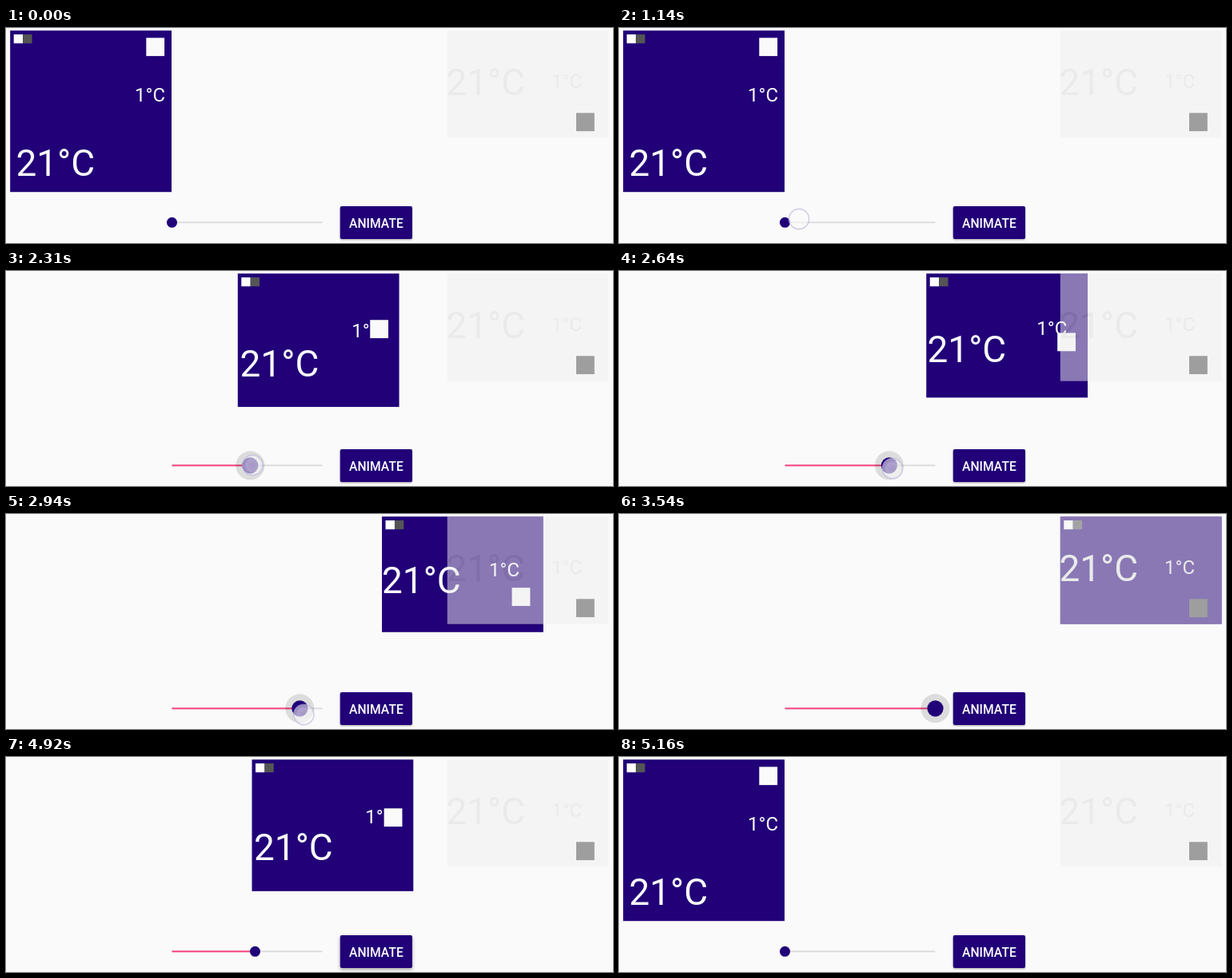
Recreate the animation shown at these times as an HTML page. Size 759x269 px, loop 6450 ms.

```html
<!DOCTYPE html>
<html lang="en">
<head>
<meta charset="utf-8">
<title>Card transition</title>
<style>
  /* p: progress, grip: thumb pressed, lift: button pressed, dx/ty/tap: finger offset, height and visibility */
  @property --p    { syntax: "<number>"; inherits: true; initial-value: 0; }
  @property --grip { syntax: "<number>"; inherits: true; initial-value: 0; }
  @property --lift { syntax: "<number>"; inherits: true; initial-value: 0; }
  @property --dx   { syntax: "<number>"; inherits: true; initial-value: 0; }
  @property --ty   { syntax: "<number>"; inherits: true; initial-value: 239; }
  @property --tap  { syntax: "<number>"; inherits: true; initial-value: 0; }

  html, body { margin: 0; width: 100%; height: 100%; overflow: hidden; background: #fafafa; }
  svg {
    display: block; width: 100vw; height: 100vh;
    font-family: Roboto, Arial, sans-serif;
    animation: 6450ms linear infinite;
    animation-name: slide, grip, lift, reach, drop, tap;
  }

  @keyframes slide {
    0%, 19.07% { --p: 0; }
    19.53% { --p: .11; }
    25.12% { --p: .39; }
    26.51%, 27.44% { --p: .42; }
    28.84%, 31.16% { --p: .475; }
    32.56%, 35.35% { --p: .503; }
    35.81% { --p: .52; }
    45.58% { --p: .85; }
    50.7% { --p: 1; }
    73.02% { --p: 1; animation-timing-function: ease-in-out; }
    80%, 100% { --p: 0; }
  }
  @keyframes grip {
    0%, 17.67% { --grip: 0; }
    20.5%, 57.9% { --grip: 1; }
    61.4%, 100% { --grip: 0; }
  }
  @keyframes lift {
    0%, 72.1% { --lift: 0; }
    74%, 76% { --lift: 1; }
    79.8%, 100% { --lift: 0; }
  }
  @keyframes reach {
    0%, 17.67% { --dx: 17.5; }
    19.07% { --dx: 21; }
    19.53% { --dx: 2; }
    25.12% { --dx: -.5; }
    35.81% { --dx: 3; }
    45.58% { --dx: 5; }
    50.7%, 60% { --dx: 7; }
    60.01%, 100% { --dx: 78.5; }
  }
  @keyframes drop {
    0%, 25.12% { --ty: 239; }
    35.81% { --ty: 243; }
    45.58% { --ty: 251; }
    50.7%, 60% { --ty: 254; }
    60.01%, 100% { --ty: 245; }
  }
  @keyframes tap {
    0%, 17.66% { --tap: 0; }
    17.67%, 53.6% { --tap: 1; }
    54.9%, 72.08% { --tap: 0; }
    72.09%, 72.9% { --tap: 1; }
    73.9%, 100% { --tap: 0; }
  }

  .panel { x: calc(5.2px + 546.6px * var(--p)); height: calc(202px - 67.5px * var(--p)); }
  .marker { transform: translateX(calc(546.6px * var(--p))); }
  .big   { font-size: 46px; transform: translate(calc(12.4px + 538px * var(--p)), calc(184.5px - 101px * var(--p))); }
  .small { font-size: 24px; transform: translate(calc(161px + 521px * var(--p)), calc(92px - 17px * var(--p))); }
  .box   { transform: translate(calc(175.3px + 537.7px * var(--p)), calc(12.3px + 94px * var(--p))); }
  .ghost { --p: 1; opacity: .5; }

  .fill  { width: calc(188px * var(--p)); }
  .thumb { transform: translate(calc(207.5px + 188px * var(--p)), 243.3px); }
  .halo  { opacity: var(--grip); }
  .knob  { r: calc(6.5px + 3.6px * var(--grip)); }
  .button {
    filter: drop-shadow(0 calc(1px + 1.5px * var(--lift)) calc(1px + 1px * var(--lift)) rgba(0, 0, 0, .35));
  }
  .label { font-size: 15.7px; font-weight: 500; }
  .touch {
    opacity: var(--tap);
    transform: translate(calc(207.5px + 188px * var(--p) + 1px * var(--dx)), calc(1px * var(--ty)));
  }
</style>
</head>
<body>
<svg viewBox="0 0 759 269">
  <defs>
    <radialGradient id="glow">
      <stop offset="0" stop-color="#fafafa" stop-opacity=".6"/>
      <stop offset=".6" stop-color="#fafafa" stop-opacity=".65"/>
      <stop offset="1" stop-color="#fafafa" stop-opacity=".5"/>
    </radialGradient>
  </defs>

  <g fill="#fafafa">
    <rect class="panel" y="3.2" width="201.8" fill="#210078"/>
    <g class="marker">
      <rect x="9.7" y="8" width="11.4" height="11.2" fill="#fff"/>
      <rect x="21.1" y="8" width="11.4" height="11.2" fill="#555"/>
    </g>
    <text class="big">21°C</text>
    <text class="small">1°C</text>
    <rect class="box" width="22.8" height="22.8"/>
  </g>

  <g class="ghost" fill="#dcdcdc">
    <rect class="panel" y="3.2" width="201.8" fill="#f0f0f0"/>
    <text class="big">21°C</text>
    <text class="small">1°C</text>
    <rect class="box" width="22.8" height="22.8" fill="#444"/>
  </g>

  <rect x="207.5" y="242.3" width="188" height="2" fill="#dcdcdc"/>
  <rect class="fill" x="207.5" y="242.3" height="2" fill="#f8467f"/>
  <g class="thumb">
    <circle class="halo" r="18" fill="#000" fill-opacity=".12"/>
    <circle class="knob" fill="#210078"/>
  </g>

  <rect class="button" x="417.8" y="223" width="90.2" height="41" rx="2" fill="#210078"/>
  <text class="label" x="462.9" y="249.6" text-anchor="middle" fill="#fff">ANIMATE</text>

  <circle class="touch" r="12.6" fill="url(#glow)" stroke="#b9b3de" stroke-opacity=".6" stroke-width="1.6"/>
</svg>
</body>
</html>
```
